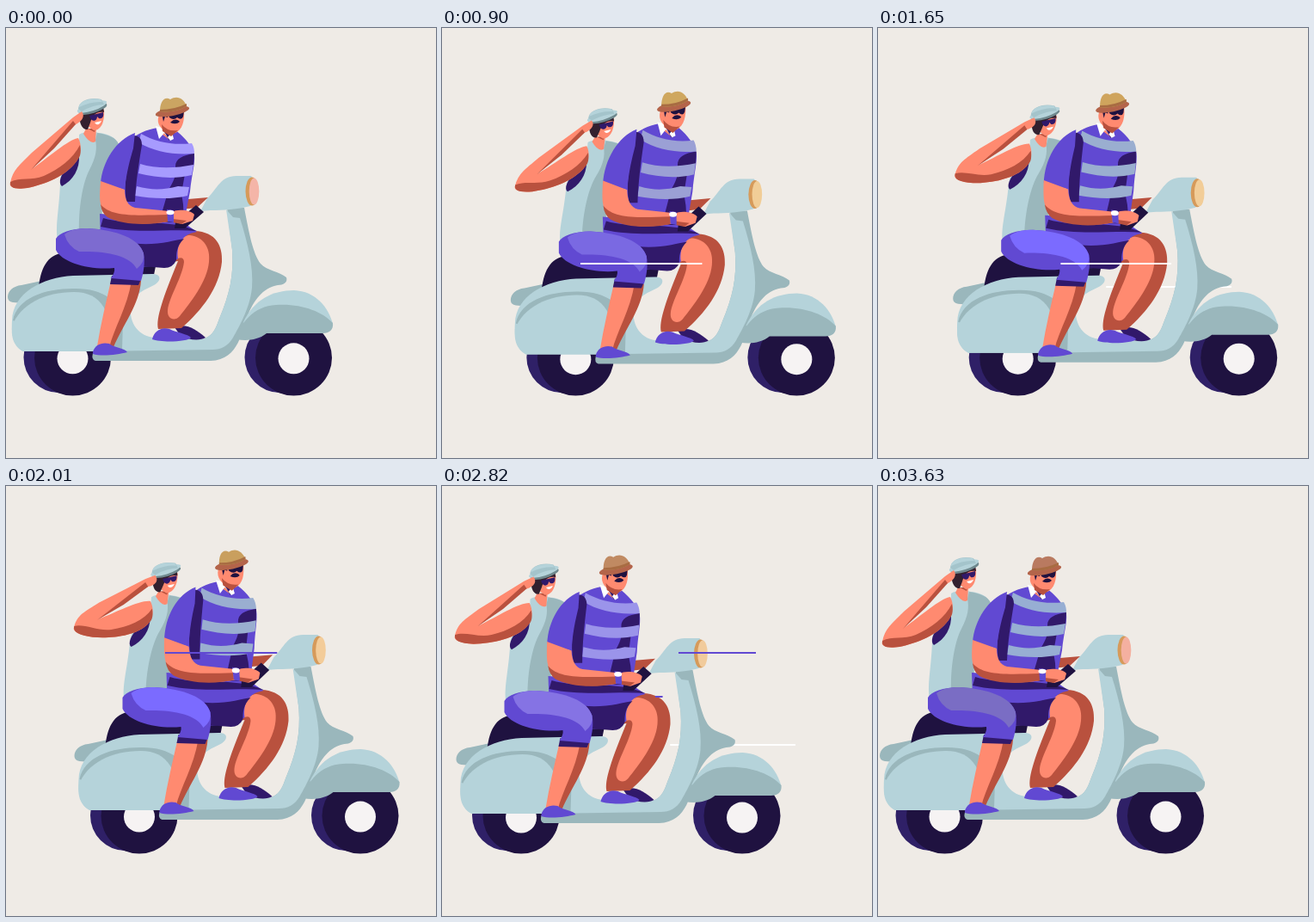
These frames come from a looping animation (500 by 500 pixels, 3660 ms). An HTML page with a canvas:

```html
<!DOCTYPE html>
<html lang="en">
<head>
<meta charset="utf-8">
<title>Scooter ride</title>
<style>
html, body { margin: 0; width: 100%; height: 100%; overflow: hidden; background: #efebe6; }
canvas { display: block; width: 500px; height: 500px; }
</style>
</head>
<body>
<canvas id="stage" width="500" height="500"></canvas>
<script>
const ctx = document.getElementById('stage').getContext('2d');
const LOOP = 3660;
const C = {
  bg: '#efebe6', blue: '#b5d3da', mid: '#9ab7bc', navy: '#1f1240', tyre: '#2f2067',
  purple: '#6149d2', plum: '#31196a', skin: '#ff8a70', tan: '#b9513e', white: '#f6f3f3'
};

// Smooth track through [time, value] points, without overshoot.
function track(points) {
  const slope = i => (points[i + 1][1] - points[i][1]) / (points[i + 1][0] - points[i][0]);
  const tangent = i => {
    if (i === 0 || i === points.length - 1) return 0;
    const a = slope(i - 1), b = slope(i);
    return a * b <= 0 ? 0 : 2 * a * b / (a + b);
  };
  return t => {
    let i = 0;
    while (i < points.length - 2 && t >= points[i + 1][0]) i++;
    const [t0, v0] = points[i], [t1, v1] = points[i + 1];
    const d = t1 - t0, u = (t - t0) / d, w = 1 - u;
    return v0 * (1 + 2 * u) * w * w + tangent(i) * d * u * w * w
      + v1 * u * u * (3 - 2 * u) - tangent(i + 1) * d * u * u * w;
  };
}
const POSE_TIMES = [0, 540, 1290, 2010, 2520, 2820, 3630, LOOP];
const pose = (...values) => track(POSE_TIMES.map((t, i) => [t, values[i]]));
const tint = (...colors) => {
  const channels = [1, 3, 5].map(k => pose(...colors.map(c => parseInt(c.substr(k, 2), 16))));
  return t => `rgb(${channels.map(f => Math.round(f(t))).join(',')})`;
};

const rideX = track([[0, 0], [540, 53], [1080, 84.5], [1370, 87.5], [2010, 77.5], [2520, 40.5],
  [2820, 14.5], [3240, 1.5], [LOOP, 0]]);
const rideY = track([[0, 0], [270, 5.5], [540, 0], [800, 5.5], [1050, 0], [1290, 5], [1560, 0],
  [1800, 5.5], [2010, 1], [2270, 0], [2520, 5.5], [2670, 2], [2820, 5], [3000, 1], [3240, 5.5],
  [3500, 3], [3630, 1], [LOOP, 0]]);
const manY = track([[0, 0], [270, -9], [540, -.5], [830, -9], [1050, 2], [1290, 3], [1560, -9],
  [1800, 3], [2010, -6], [2080, -9], [2300, 1], [2400, -6], [2520, 2], [2670, -8], [2820, 0],
  [3000, -9], [3230, 3], [3420, -9], [3630, 1], [LOOP, 0]]);
const manX = pose(0, -1, -3, -9, -5, -6, 0, 0);
const womanX = pose(0, 7, 8, 7.5, 4.5, 3.5, 0, 0);
const womanY = pose(0, 8, 5, 5, 6.5, 3, 0, 0);
const elbowX = pose(0, 2, 2, -3.5, -.5, -4.5, 0, 0);
const elbowY = pose(0, 1.5, -4, -17, -4.5, -11, 0, 0);

const stripeTint = tint('#a79bfe', '#9d94df', '#9aaed0', '#9aaed0', '#b3a8e0', '#9b94ea', '#97aed3', '#a79bfe');
const thighTint = tint('#7d6bd0', '#7a67c8', '#7b6bff', '#7b6bff', '#7867cc', '#8573e4', '#7a6dc4', '#7d6bd0');
const hatTint = tint('#cba562', '#cba562', '#d4a95c', '#c99f5e', '#cba05e', '#c08a62', '#b97a60', '#cba562');
const lampTint = tint('#f4b5a8', '#f3cc99', '#f0cd96', '#f3cc99', '#f3cc99', '#f1cb9c', '#f4b0a0', '#f4b5a8');

function fill(color, d) {
  ctx.fillStyle = color;
  ctx.fill(new Path2D(d));
}
function oval(color, x, y, rx, ry = rx, angle = 0) {
  ctx.fillStyle = color;
  ctx.beginPath();
  ctx.ellipse(x, y, rx, ry, angle, 0, 7);
  ctx.fill();
}
function scoped(draw) {
  ctx.save();
  draw();
  ctx.restore();
}
// Leans everything above the pivot height; the full offset is reached at pivot - reach.
function lean(pivot, reach, dx, dy) {
  ctx.transform(1, 0, -dx / reach, 1 - dy / reach, dx * pivot / reach, dy * pivot / reach);
}
// Maps triangle p to triangle q.
function warp(p, q) {
  const [[x0, y0], [x1, y1], [x2, y2]] = p;
  const ax = x1 - x0, ay = y1 - y0, bx = x2 - x0, by = y2 - y0, det = ax * by - ay * bx;
  const solve = k => {
    const u = q[1][k] - q[0][k], v = q[2][k] - q[0][k];
    const m = (u * by - v * ay) / det, n = (v * ax - u * bx) / det;
    return [m, n, q[0][k] - m * x0 - n * y0];
  };
  const [a, c, e] = solve(0), [b, d, f] = solve(1);
  ctx.transform(a, b, c, d, e, f);
}

// Streaks grow leftwards from the right end, then their tail catches up.
const STREAK = 210, LAG = 205;
const streaks = [
  { y: 194, right: 365, color: C.purple, starts: [187, 937, 1747, 2715, 3190] },
  { y: 245, right: 428, color: C.purple, starts: [325, 1287, 2415, 3180] },
  { y: 274, right: 341, color: '#fff', starts: [650, 1500, 2320, 3050] },
  { y: 255, right: 318, color: C.purple, starts: [800, 1450, 2300], back: true },
  { y: 301, right: 411, color: '#fff', starts: [350, 1480, 2650], back: true }
];
function drawStreaks(t, back) {
  const clamp = v => Math.min(1, Math.max(0, v));
  for (const s of streaks) {
    if (!!s.back !== back) continue;
    for (const start of s.starts) {
      const head = clamp((t - start) / STREAK), tail = clamp((t - start - LAG) / STREAK);
      if (head <= tail) continue;
      ctx.fillStyle = s.color;
      ctx.fillRect(s.right - 180 * head, s.y - 1, 180 * (head - tail), 2);
    }
  }
}

function wheel(x, y) {
  oval(C.tyre, x - 16, 383, 41, 41);
  fill(C.tyre, `M${x - 30} 421L${x - 4} 427L${x} 390Z`);
  oval(C.navy, x, 383.5, 44.5, 44);
  oval(C.white, x, 384.3 + y * .25, 18);
}

function scooter(t) {
  fill(C.mid, 'M2 313C2 306 8 300 18 299L60 290L50 304L20 320L8 319Q2 318 2 313Z');
  fill(C.navy, 'M38 301C41 276 50 262 70 261L174 277L172 287L60 292Z');
  // frame and floor
  fill(C.mid, 'M257 209L277 209C283 240 287 262 296 274C303 282 318 283 326 290C328 296 322 299 316 299C298 302 288 318 282 332C274 350 272 386 238 387L104 387Q99 386 101 378L222 362C239 362 243 352 248 338C260 309 265 288 263 258Z');
  fill(C.blue, 'M7 340C8 308 42 290 78 288L170 286C182 286 180 295 172 299C155 307 147 312 145 324C143 343 154 359 174 360L222 362C239 362 243 352 248 338C260 309 265 288 263 258L256 211L264 220L272 221C281 250 288 278 286 302C284 324 272 346 264 360C258 370 250 374 240 374L102 376L20 376C8 370 6 354 7 340Z');
  // rear panel
  fill(C.mid, 'M8 340C13 314 45 303 78 303C112 302 134 318 136 342L135 374L100 374Z');
  fill(C.blue, 'M7 347C16 321 46 307 79 307C111 307 124 330 123 376L20 376C8 370 6 358 7 347Z');
  // front fender
  fill(C.blue, 'M276 342C288 316 310 305 335 305C360 306 375 325 380 344L368 351L280 352Z');
  fill(C.mid, 'M268 361C272 344 288 323 314 322C342 320 367 329 380 343C381 351 376 355 368 355L303 355C293 363 280 364 268 362Z');
  // handlebar and lamp
  fill(C.blue, 'M226 213L234 198C246 187 249 172 268 172L285 172C292 180 292 200 284 207C270 211 252 212 238 212Z');
  oval('#d69a5a', 286, 190, 7.5, 16.5);
  oval(lampTint(t), 288.5, 190, 5.8, 15.5);
}

function womanTorso() {
  fill(C.blue, 'M85 124C90 120 103 120 108 122C120 123 128 128 131 135C122 150 112 165 112 190L112 246L60 246C57 230 62 210 63 180C64 160 75 145 85 130Z');
  fill(C.mid, 'M106 122C120 124 128 128 131 135C116 150 111 165 111 190L112 244L85 240C84 210 89 180 97 165C105 150 106 140 104 130Z');
  fill(C.plum, 'M85 148C86 164 78 177 65 184C60 180 64 170 72 160Z');
  fill(C.skin, 'M93 117L105 117L104 132Q98 136 90 123Z');
  fill(C.tan, 'M95 117L104 117L103 121Z');
}
function womanHead() {
  fill(C.skin, 'M96 97L114 95C115 108 111 119 102 119L95 114Z');
  fill('#33202f', 'M86 98L113 91L114 98C104 96 100 103 98 110L95 118C88 119 84 108 86 98Z');
  fill(C.plum, 'M97 102L113 98C114 103 112 106 108 105L106 103C106 109 99 110 97 102Z');
  fill('#fff', 'M103 110L111 108Q109 113 105 112Z');
  oval('#6f898e', 101, 94, 17, 5, -.3);
  oval(C.blue, 100, 91.5, 18, 4.8, -.32);
  fill('#a4c4cb', 'M84 94C85 84 98 80 111 83L114 89Q102 89 88 97Z');
  fill(C.blue, 'M85 90C88 84 99 81 110 83L112 86Q99 85 85 92Z');
}
function womanArm() {
  fill(C.skin, 'M84 128C88 135 88 145 82 155C70 172 45 182 25 186C10 188 3 185 5 180C8 165 15 160 30 145L78 104L88 97C93 103 87 110 79 113L55 140L30 164C50 150 72 130 84 128Z');
  fill(C.tan, 'M5 179C16 173 30 178 44 172C62 164 78 152 86 136C88 146 86 150 82 155C70 172 45 182 25 186C10 188 4 186 5 179Z');
  fill(C.tan, 'M29 165L78 108L81 112L56 140Z');
}

function woman(t) {
  const dx = womanX(t), dy = womanY(t), w = 105 / 135;
  scoped(() => {
    lean(240, 135, dx, dy);
    womanTorso();
    womanHead();
  });
  scoped(() => {
    warp([[80, 135], [5, 183], [85, 103]],
      [[80 + dx * w, 135 + dy * w], [5 + elbowX(t), 183 + elbowY(t)], [85 + dx, 103 + dy]]);
    womanArm();
  });
}

function womanLegs(t) {
  fill(C.skin, 'M122 294C116 320 110 345 106 370L124 374C130 350 150 330 156 295Z');
  fill(C.tan, 'M146 294L157 294C155 322 136 345 125 371L120 372C125 350 141 325 146 294Z');
  fill(C.plum, 'M123 288L157 292L154 299L121 298Z');
  fill(C.purple, 'M58 245C62 238 75 233 95 233C130 235 155 245 160 262C162 272 160 285 157 294L122 291Q127 284 126 279C98 282 65 273 58 258Z');
  fill(thighTint(t), 'M68 240C75 234 85 233 95 233C130 235 155 245 160 262Q162 272 152 280C144 264 115 259 85 260Q72 254 68 240Z');
  fill(C.purple, 'M101 377C103 368 112 365 120 367C126 372 138 372 141 377C130 380 110 382 101 379Z');
}

function manLegs() {
  fill(C.plum, 'M196 348C210 343 220 350 232 360C226 364 212 363 203 358Z');
  fill(C.tan, 'M194 272C199 250 205 236 219 236C245 237 252 254 251 272C248 302 228 328 204 349L177 350C174 338 183 312 200 271Z');
  fill(C.skin, 'M196 270C198 250 204 241 214 241C230 243 238 256 236 272C234 295 214 320 202 335C196 342 187 338 188 328C190 312 205 290 207 272C207 266 202 266 196 270Z');
  fill(C.purple, 'M170 362C172 352 181 347 190 350C198 354 212 356 215 360C212 365 180 366 170 362Z');
  fill(C.purple, 'M109 216L200 222L222 237C204 240 198 252 200 268L190 276L150 278L110 246Z');
  fill(C.plum, 'M138 248C165 256 195 247 207 245C198 254 198 262 198 270Q194 279 184 279L158 277Z');
  fill(C.plum, 'M113 221C140 230 190 221 222 236C190 233 150 240 110 231Z');
}

function manHead(t) {
  fill(C.skin, 'M181 97L207 95C208 108 205 118 197 122L184 119C176 114 174 105 181 97Z');
  fill(C.navy, 'M181 98L188 96L188 104L185 103L183 109Z');
  fill(C.tan, 'M181 112Q188 121 200 119L192 126L182 120Z');
  fill(C.navy, 'M188 99L207 97L206 103Q204 108 199 104Q195 108 190 104Z');
  fill(C.navy, 'M191 110C195 105 200 106 202 109Q198 113 191 110Z');
  oval('#b4644a', 193.5, 97, 20, 5, -.2);
  fill(hatTint(t), 'M179 97C179 86 184 79 191 83C199 78 207 82 210 91Q196 99 179 97Z');
  fill('#a86c42', 'M179 95Q196 95 210 88L210 91Q196 99 179 97Z');
}

function manUpper(t) {
  fill(C.tan, 'M200 200L235 197L222 209L203 211Z');
  fill(C.purple, 'M176 116C163 118 152 124 147 128C138 150 135 180 137 200L140 226L207 226L214 190C216 170 220 158 219 148C216 135 205 125 196 118Z');
  fill(C.plum, 'M219 146C205 148 197 152 197 161C199 171 194 180 189 188L178 226L207 226L206 205L204 192L208 170Q211 162 218 160Z');
  const stripe = stripeTint(t);
  fill(stripe, 'M157 123C173 132 194 137 216 134Q219 139 219 146C196 148 172 144 154 133Z');
  fill(stripe, 'M156 158C175 164 198 163 218 159L216 171C196 176 174 174 154 169Z');
  fill(stripe, 'M152 184C170 189 184 188 200 184L213 185L211 195C190 200 168 198 150 195Z');
  fill(C.skin, 'M180 114L195 119L190 130L182 124Z');
  fill(C.plum, 'M182 118L194 122L190 131Z');
  fill('#fff', 'M174 114L178 129L184 122L191 131L195 129L193 121L188 127L181 116Z');
  manHead(t);
  fill(C.plum, 'M146 125Q158 124 158 136C154 160 151 180 150 202L140 202C136 180 142 160 146 140Z');
  fill(C.purple, 'M150 122C128 130 112 155 110 181L138 188C140 168 144 154 148 140Z');
  // near arm with watch
  fill(C.navy, 'M197 226L221 206L230 214L208 233L196 233Z');
  fill(C.skin, 'M110 178L138 188C138 200 142 207 150 209L190 213L190 225C165 229 140 228 126 222C108 213 108 204 110 178Z');
  fill(C.tan, 'M110 205C122 220 152 218 188 217L188 225C165 230 135 229 118 220Q111 215 110 205Z');
  fill(C.skin, 'M193 214C200 210 215 212 219 217L217 224L205 228L195 225Z');
  fill(C.tan, 'M194 222L210 224L204 228L194 226Z');
  fill(C.purple, 'M187 211L195 212L195 226L188 225Z');
  oval('#fff', 191, 214.5, 4.5, 2.8);
}

function frame(now) {
  const t = now % LOOP, x = rideX(t), y = rideY(t);
  ctx.fillStyle = C.bg;
  ctx.fillRect(0, 0, 500, 500);
  drawStreaks(t, true);
  scoped(() => {
    ctx.translate(x, 0);
    wheel(77.5, y);
    wheel(334.5, y);
    ctx.translate(0, y);
    scooter(t);
    woman(t);
    manLegs();
    scoped(() => {
      lean(235, 145, manX(t), manY(t) - y);
      manUpper(t);
    });
    womanLegs(t);
  });
  drawStreaks(t, false);
}

let begin;
function tick(now) {
  begin ??= now;
  frame(now - begin);
  requestAnimationFrame(tick);
}
frame(0);
requestAnimationFrame(tick);
</script>
</body>
</html>
```
